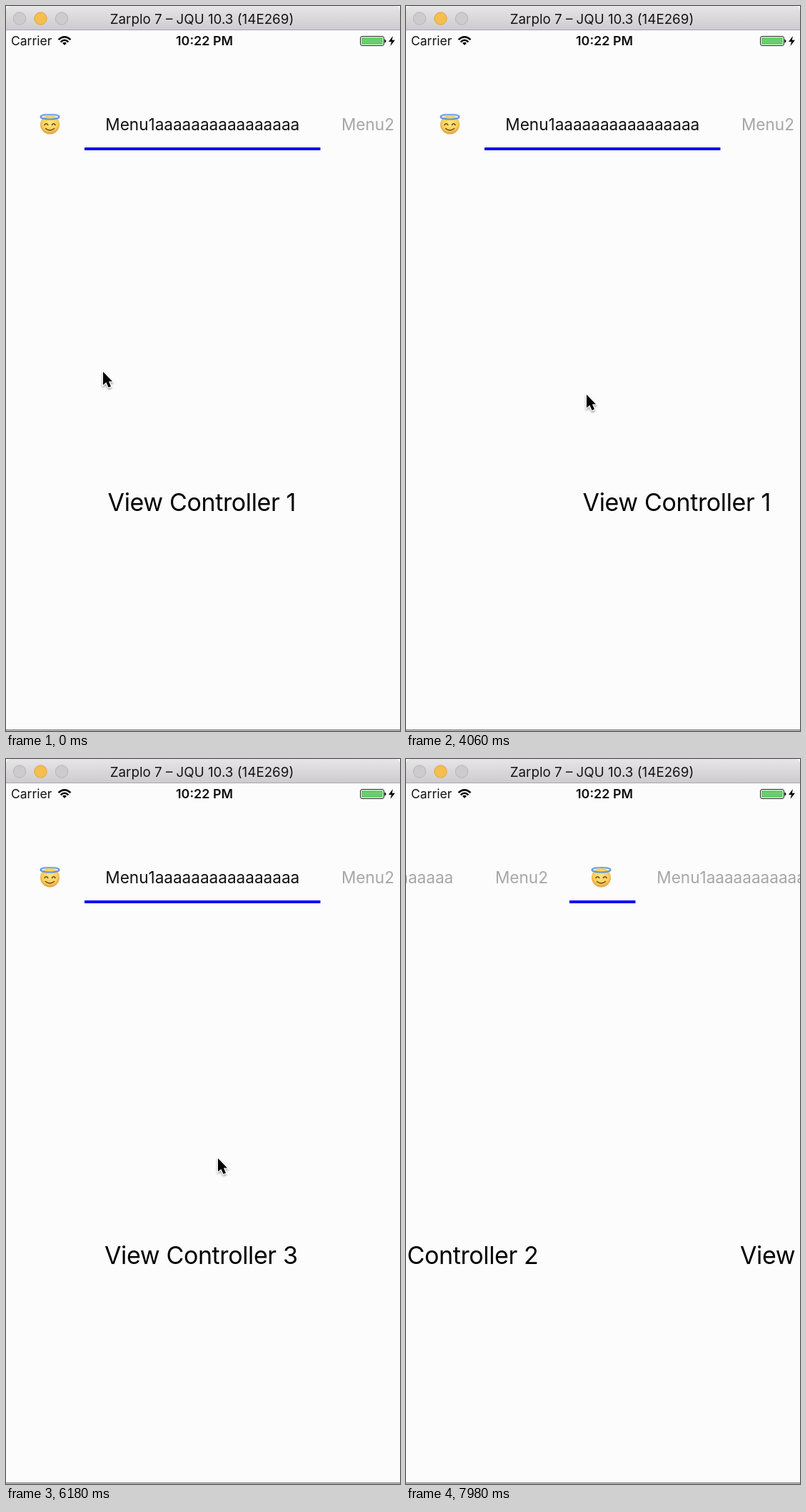
These frames come from a looping animation (552x1015 px, 8000 ms). An HTML page:

```html
<!DOCTYPE html>
<html lang="en">
<head>
<meta charset="utf-8">
<title>Paging menu</title>
<style>
  html, body { margin: 0; width: 100%; height: 100%; overflow: hidden; background: #fcfcfc; }
  svg { display: block; width: 552px; height: 1015px; font-family: Inter, Roboto, sans-serif; }
  .menu { font-size: 22.55px; fill: #a7a7a9; }
  .page { font-size: 34px; letter-spacing: -.38px; text-anchor: middle; }
</style>
</head>
<body>
<svg viewBox="0 0 552 1015">
  <defs>
    <linearGradient id="chrome" x2="0" y2="1">
      <stop stop-color="#e7e5e8"/><stop offset="1" stop-color="#cecbcf"/>
    </linearGradient>
    <radialGradient id="skin" cy=".42" r=".58">
      <stop stop-color="#ffe680"/><stop offset=".7" stop-color="#f8cd5c"/><stop offset="1" stop-color="#e09a3a"/>
    </radialGradient>
    <filter id="shadow" x="-50%" y="-30%" width="220%" height="180%">
      <feDropShadow dx="0" dy="2" stdDeviation="1.6" flood-opacity=".4"/>
    </filter>
    <g id="angel" fill="none" stroke-linecap="round">
      <circle cx="14.5" cy="166" r="13.5" fill="url(#skin)"/>
      <ellipse cx="14.5" cy="155.300" rx="13" ry="3.200" stroke="#5a93e2" stroke-width="2"/>
      <path d="M3 154Q14.500 150 26 154" stroke="#9cc8f5" stroke-width=".8"/>
      <path d="M7 166.500q2.400-3.600 4.800 0M17.300 166.500q2.400-3.600 4.800 0M8.500 171.500q6 5 12 0" stroke="#6b4212" stroke-width="1.500"/>
    </g>
  </defs>

  <rect width="552" height="1015" fill="#fcfcfc"/>
  <g id="pages"></g>
  <g id="menu"></g>
  <rect id="bar" y="198" height="4" fill="#0505fa"/>

  <path d="M0 33.500V7Q0 0 7 0H545Q552 0 552 7V33.500Z" fill="url(#chrome)"/>
  <path d="M0 33.500H552" stroke="#aaa6bd"/>
  <g fill="#cecbce" stroke="#b7b4b7">
    <circle cx="19" cy="17.500" r="8.700"/>
    <circle cx="48.500" cy="17.500" r="8.700" fill="#f6be4f" stroke="#dea545"/>
    <circle cx="78" cy="17.500" r="8.700"/>
  </g>
  <text x="274.500" y="25" font-size="18.800" text-anchor="middle" fill="#151515">Zarplo 7 – JQU 10.3 (14E269)</text>

  <text x="7" y="55" font-size="17.500" fill="#111">Carrier</text>
  <g fill="none" stroke="#000" stroke-width="2.400">
    <path d="M73.500 47.200Q82 39.200 90.500 47.200M76.600 50.300Q82 45.200 87.400 50.300"/>
    <path d="M79 51.800Q82 49.500 85 51.800L82 55Z" fill="#000" stroke="none"/>
  </g>
  <text x="278" y="55" font-size="17.900" font-weight="600" text-anchor="middle" fill="#111">10:22 PM</text>
  <rect x="496.500" y="42.500" width="33" height="13" rx="2.500" fill="none" stroke="#222"/>
  <rect x="498" y="44" width="30" height="10" rx="1" fill="#67cf6b"/>
  <path d="M530.500 46.500q2 .5 2 2.500t-2 2.500ZM542 42l-6 8h4l-1.500 6 6.500-8.300h-4.200Z"/>

  <path d="M0 1013.700H552" stroke="#66666a" stroke-width="1.300"/>
  <g id="cursor" filter="url(#shadow)">
    <path d="M0 0V18.500L4.400 14.800 7.600 22 11 20.600 7.900 13.400H13Z" stroke="#fff" stroke-width="2" paint-order="stroke"/>
  </g>
</svg>
<script>
const LOOP = 8000, PAGE = 553, STRIP = 557, SCROLL = 212;
const $ = id => document.getElementById(id);
const clamp = u => Math.min(1, Math.max(0, u));
const smooth = u => u * u * (3 - 2 * u);
const span = (t, from, to) => clamp((t - from) / (to - from));

// Eased interpolation through [time, ...values] keys.
function track(keys, t) {
  const i = keys.findIndex(k => k[0] > t);
  if (i < 0) return keys.at(-1).slice(1);
  const [a, b] = [keys[i - 1], keys[i]];
  const u = smooth(span(t, a[0], b[0]));
  return a.slice(1).map((v, n) => v + (b[n + 1] - v) * u);
}

const pointerKeys = [
  [0, 136, 512], [700, 121, 541], [3260, 121, 541], [4060, 253, 544],
  [4920, 275, 546], [5300, 460, 556], [5700, 460, 585], [6640, 145, 535]
];
const slowDrag = [[0, 0], [3360, 0], [4060, 105], [4920, 116]];

const secondDrag = t => 329 * span(t, 7560, 7980) ** 2;

function pageShift(t) {
  if (t < 5020) return track(slowDrag, t)[0];
  if (t < 5210) return 116 + 40 * span(t, 5020, 5210) ** 2;
  return PAGE - 397 * Math.exp((5210 - t) / 162) + secondDrag(t);
}

const pages = [1, 3, 2].map((number, i) =>
  `<text class="page" x="${274.3 - i * PAGE}" y="707">View Controller ${number}</text>`);
$('pages').innerHTML = pages.join('');

const longLabel = 'Menu1' + 'a'.repeat(16);
$('menu').innerHTML = [-STRIP, 0, STRIP].map(x => `
  <use href="#angel" x="${x + 47}"/>
  <text class="menu" x="${x + 139.3}" y="173.500">${longLabel}</text>
  <text class="menu" x="${x + 470}" y="173.500">Menu2</text>`).join('');
const selectedLabel = $('menu').querySelectorAll('text')[2];

function render(t) {
  $('pages').setAttribute('transform', `translate(${pageShift(t)})`);

  const progress = smooth(span(t, 6720, 7022));
  $('menu').setAttribute('transform', `translate(${SCROLL * progress})`);
  selectedLabel.style.fill = progress < .5 ? '#111' : '';
  const width = 330.5 - 238 * progress;
  $('bar').setAttribute('x', 275.2 - width / 2);
  $('bar').setAttribute('width', width);

  const [x, y] = track(pointerKeys, t);
  $('cursor').setAttribute('transform', `translate(${x + secondDrag(t)} ${y})`);
  $('cursor').style.visibility = t < 7900 ? 'visible' : 'hidden';
}

const start = performance.now();
function tick() {
  render((performance.now() - start) % LOOP);
  requestAnimationFrame(tick);
}
tick();
</script>
</body>
</html>
```
